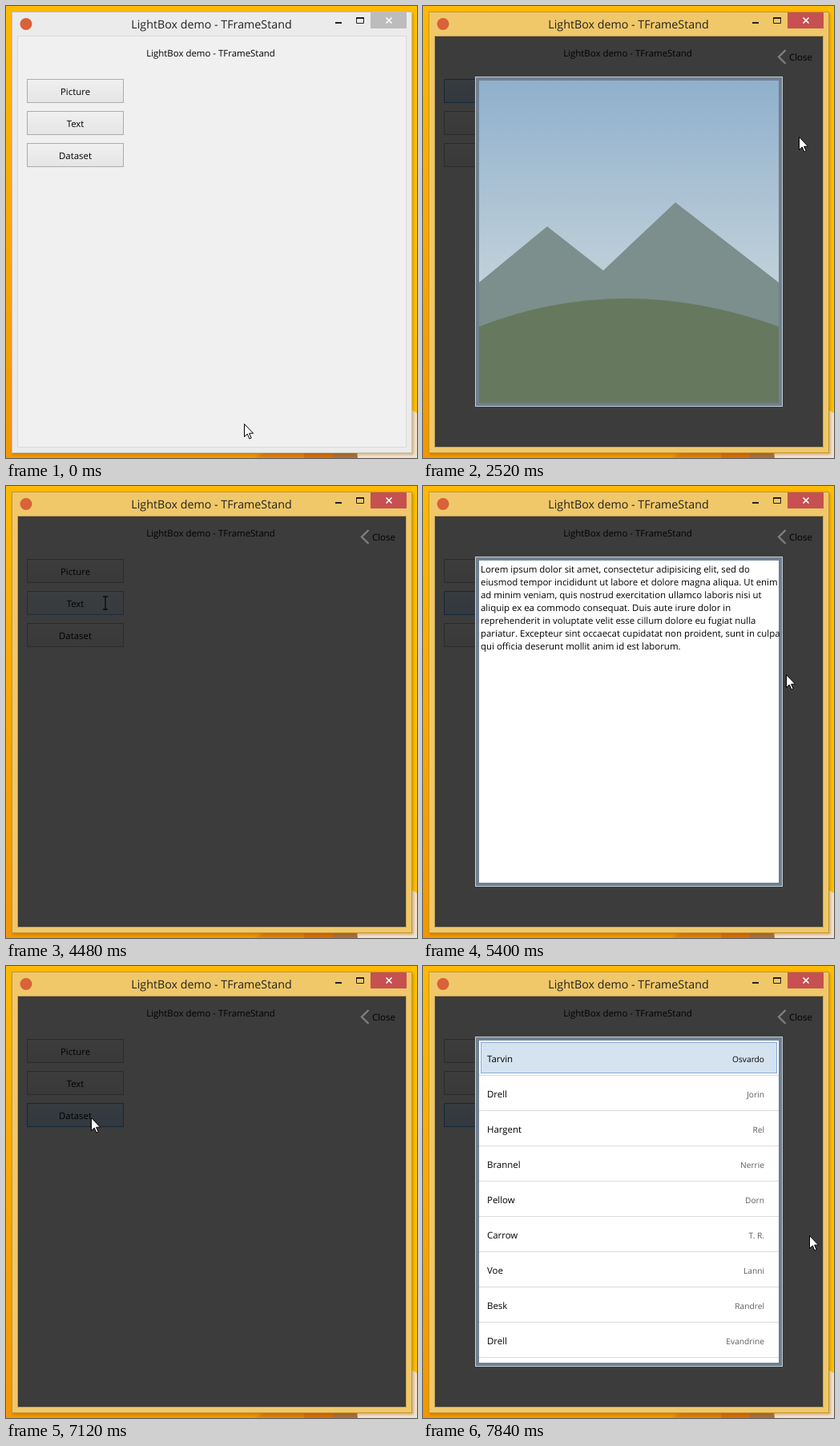
These frames come from a looping animation (513 by 564 pixels, 8 s). An HTML page:

```html
<!DOCTYPE html>
<html lang="en">
<head>
<meta charset="utf-8">
<title>LightBox demo</title>
<style>
html, body { margin: 0; width: 100%; height: 100%; overflow: hidden; background: #fb0; }
svg { display: block; width: 513px; height: 564px; }
text { font: 11.45px "Open Sans", "Noto Sans", sans-serif; fill: #000; white-space: pre; text-rendering: geometricPrecision; }
.title { font-size: 14.28px; fill: #222; }
.mid { text-anchor: middle; }
.first { font-size: 10.2px; text-anchor: end; fill: #5c5c5c; }
.frame { fill: #ebebeb; stroke: #c9c0a8; }
.edge { fill: #f0f0f0; stroke: #d9d9d9; }
.x { fill: #bcbcbc; }
.active .frame { fill: #f0c869; stroke: #c4952f; }
.active .edge { stroke: #c9a551; }
.active .x { fill: #c75050; }
.btn rect { fill: url(#plain); stroke: #acacac; }
.btn.hover rect { fill: url(#hover); stroke: #7eb4ea; }
.btn.down rect { fill: url(#down); stroke: #569de5; }
</style>
</head>
<body>
<svg viewBox="0 0 513 564">
  <defs>
    <linearGradient id="desk" x2="0" y2="1"><stop stop-color="#ffb900"/><stop offset=".5" stop-color="#fba800"/><stop offset="1" stop-color="#f29700"/></linearGradient>
    <linearGradient id="plain" x2="0" y2="1"><stop stop-color="#f0f0f0"/><stop offset="1" stop-color="#e5e5e5"/></linearGradient>
    <linearGradient id="hover" x2="0" y2="1"><stop stop-color="#ecf4fc"/><stop offset="1" stop-color="#dcecfc"/></linearGradient>
    <linearGradient id="down" x2="0" y2="1"><stop stop-color="#daecfc"/><stop offset="1" stop-color="#c4e0fc"/></linearGradient>
    <linearGradient id="sky" x2="0" y2="1"><stop stop-color="#8fb0cc"/><stop offset="1" stop-color="#dfe4e2"/></linearGradient>
    <filter id="soft"><feGaussianBlur stdDeviation="1.6"/></filter>
  </defs>

  <rect width="513" height="564" fill="url(#desk)"/>
  <path d="M506 0h7v510h-7z" fill="#ffc000"/>
  <path d="M310 564l14-8h60v8z" fill="#e07c0c" filter="url(#soft)"/>
  <path d="M372 556h40v8h-40z" fill="#d56c0c"/>
  <path d="M408 556h30l2 8h-32z" fill="#a96f3c"/>
  <path d="M438 556h68v-52l7 4v56h-74z" fill="#f2e2ce"/>
  <rect x="8" y="9" width="501" height="551" fill="#7a4a00" opacity=".3" filter="url(#soft)"/>

  <g id="win">
    <rect class="frame" x="7.5" y="7.5" width="499" height="550"/>
    <rect class="edge" x="14.5" y="37.5" width="485" height="513"/>
    <circle cx="25" cy="22.5" r="7.5" fill="#d8623a"/>
    <text class="title mid" x="256.5" y="28">LightBox demo - TFrameStand</text>
    <path d="M411 20h8v2h-8z" fill="#222"/>
    <path d="M437.5 15v6.5h9V15M437 15h10" fill="none" stroke="#222"/>
    <path d="M437 14h10v2h-10z" fill="#222"/>
    <rect class="x" x="455" y="8" width="45" height="20"/>
    <path d="M474.5 14.5l7 7m0-7l-7 7" stroke="#fff" stroke-width="1.6"/>
  </g>
  <text class="mid" x="255.5" y="63">LightBox demo - TFrameStand</text>
  <g id="buttons"></g>

  <g id="box">
    <rect id="shade" x="15" y="38" width="484" height="512" opacity=".75"/>
    <g id="close">
      <rect id="glow" x="439" y="48" width="50" height="31" fill="#bcd8f2" opacity=".12"/>
      <path d="M452.500 55l-8.500 8.500 8.500 8.500" fill="none" stroke="#7d7d7d" stroke-width="2.4"/>
      <text x="457" y="68">Close</text>
    </g>
    <g id="panel">
      <rect x="65.500" y="88.500" width="383" height="411" fill="#708090" stroke="#c3ced8"/>
      <rect x="70" y="93" width="374" height="402" fill="#fff"/>
      <g class="page">
        <rect x="70" y="93" width="374" height="402" fill="url(#sky)"/>
        <path d="M70 345l85-70 70 55 90-85 129 100v150H70z" fill="#7d8f8c"/>
        <path d="M70 400q180-70 374 0v95H70z" fill="#66795f"/>
      </g>
      <g class="page" id="memo"></g>
      <g class="page" id="list"></g>
    </g>
  </g>

  <path id="arrow" d="M.500.500V16.500L4.300 13l2.600 6 2.300-1-2.600-5.800h5z" fill="#fff" stroke="#000"/>
  <path id="beam" d="M-3-8h2.500L0-7.500.500-8H3M0-7.500v15M-3 8h2.500L0 7.500.500 8H3" fill="none" stroke="#0a0a0a" stroke-width="1.300"/>
</svg>
<script>
const LOOP = 8000, STEP = 40;
const $ = id => document.getElementById(id);

const labels = ["Picture", "Text", "Dataset"];
$("buttons").innerHTML = labels.map((s, i) =>
  `<g class="btn"><rect x="26.5" y="${91.5 + 40 * i}" width="120" height="29"/>` +
  `<text class="mid" x="86.5" y="${111 + 40 * i}">${s}</text></g>`).join("");

const lines = [
  "Lorem ipsum dolor sit amet, consectetur adipisicing elit, sed do",
  "eiusmod tempor incididunt ut labore et dolore magna aliqua. Ut enim",
  "ad minim veniam, quis nostrud exercitation ullamco laboris nisi ut",
  "aliquip ex ea commodo consequat. Duis aute irure dolor in",
  "reprehenderit in voluptate velit esse cillum dolore eu fugiat nulla",
  "pariatur. Excepteur sint occaecat cupidatat non proident, sunt in culpa",
  "qui officia deserunt mollit anim id est laborum."
];
$("memo").innerHTML = lines.map((s, i) =>
  `<text x="72" y="${108 + 16 * i}">${s}</text>`).join("");

const people = [
  ["Tarvin", "Osvardo"], ["Drell", "Jorin"], ["Hargent", "Rel"],
  ["Brannel", "Nerrie"], ["Pellow", "Dorn"], ["Carrow", "T. R."],
  ["Voe", "Lanni"], ["Besk", "Randrel"], ["Drell", "Evandrine"]
];
$("list").innerHTML =
  `<rect x="72.5" y="95.5" width="369" height="38" fill="#d5e3f0" stroke="#84acdd"/>` +
  people.map(([last, first], i) => {
    const y = 120 + 44 * i;
    return `<text x="80" y="${y}">${last}</text>` +
      `<text class="first" x="426" y="${y}"${i ? "" : ' style="fill:#000"'}>${first}</text>` +
      `<path d="M70 ${y + 16.5}h374" stroke="#dcdcdc"/>`;
  }).join("");

// Light boxes: shown, button pressed, closing, gone, fade-in length
const shows = [
  { on: 1480, down: 1400, off: 3520, gone: 3600, fade: 800 },
  { on: 4480, down: 4520, off: 6080, gone: 6160, fade: 640 },
  { on: 7120, down: 7120, off: 9000, gone: 9000, fade: 640 }
];

// Pointer stops: time, x, y
const stops = [
  [0, 297, 521], [480, 297, 521], [680, 105, 80], [880, 105, 80],
  [1040, 91, 98], [1560, 91, 98], [2240, 444, 160], [2400, 444, 160],
  [2560, 474, 163], [3000, 474, 163], [3320, 479, 53], [3840, 479, 53],
  [4240, 124, 146], [4720, 124, 146], [5120, 453, 238], [5360, 453, 238],
  [5840, 468, 63], [6480, 468, 63], [6960, 106, 189], [7400, 106, 189],
  [7840, 482, 336], [LOOP, 482, 336]
];

const clamp = v => Math.max(0, Math.min(1, v));
const ease = v => v * v * (3 - 2 * v);
const inside = ([px, py], x, y, w, h) => px >= x && px < x + w && py >= y && py < y + h;
const show = (el, on) => { el.style.display = on ? "" : "none"; };

function pointer(t) {
  const i = stops.findIndex(s => s[0] > t);
  const [t0, x0, y0] = stops[i - 1], [t1, x1, y1] = stops[i];
  const k = ease((t - t0) / (t1 - t0));
  return [Math.round(x0 + (x1 - x0) * k), Math.round(y0 + (y1 - y0) * k)];
}

const buttons = [...document.querySelectorAll(".btn")];
const pages = [...document.querySelectorAll(".page")];

function draw(t) {
  const pos = pointer(t);
  $("win").setAttribute("class", t >= 1400 ? "active" : "");

  const n = shows.findIndex(s => t >= s.on && t < s.gone);
  const now = shows[n];
  buttons.forEach((b, i) => {
    const s = shows[i];
    const down = t >= s.down && t < s.off;
    const hover = (!now || t < now.down) && inside(pos, 26, 91 + 40 * i, 121, 30);
    b.setAttribute("class", "btn" + (down ? " down" : hover ? " hover" : ""));
  });

  show($("box"), now);
  if (now) {
    const open = t < now.off;
    $("shade").setAttribute("opacity", open ? .75 : .35);
    show($("close"), open);
    show($("glow"), inside(pos, 439, 48, 50, 32));
    $("panel").setAttribute("opacity", open ? clamp((t - now.on) / now.fade) : 0);
    pages.forEach((p, i) => show(p, i === n));
  }

  const typing = n === 1 && t < now.off && inside(pos, 70, 93, 374, 402);
  show($("arrow"), !typing);
  show($("beam"), typing);
  const move = `translate(${pos})`;
  $("arrow").setAttribute("transform", move);
  $("beam").setAttribute("transform", move);
}

const start = performance.now();
function tick() {
  const t = (performance.now() - start) % LOOP;
  draw(Math.floor(t / STEP) * STEP);
  requestAnimationFrame(tick);
}
tick();
</script>
</body>
</html>
```
